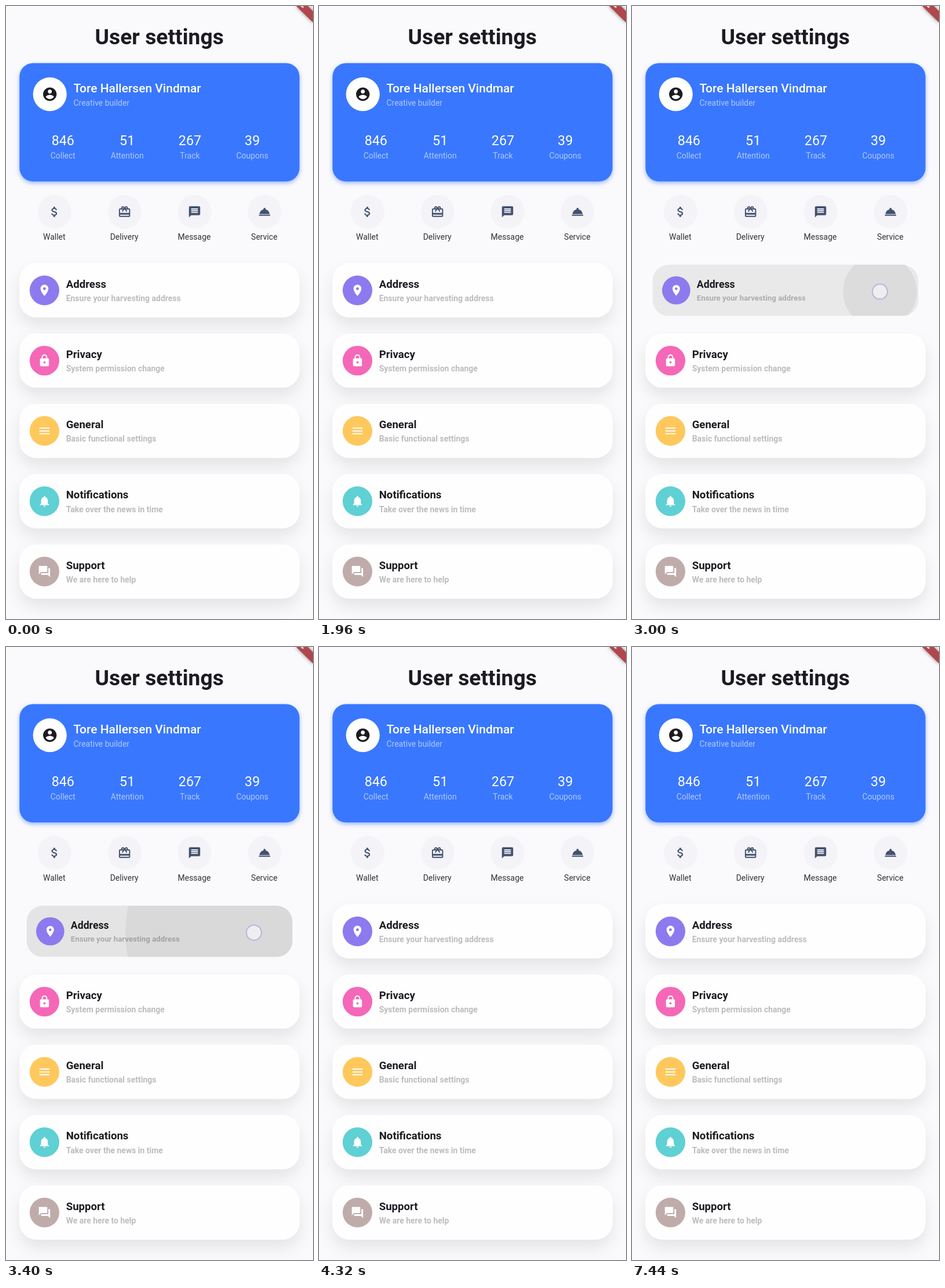
An HTML page that plays this animation: 530x1057 px, repeating every 7.48 s.

```html
<!DOCTYPE html>
<html lang="en">
<head>
<meta charset="utf-8">
<title>User settings</title>
<style>
  html, body { margin: 0; width: 100%; height: 100%; overflow: hidden; background: #faf9fc; }
  svg { display: block; width: 100%; height: 100%; }
  text { font-family: Roboto, sans-serif; }
  .mid { text-anchor: middle; }
  .bold { font-weight: 600; }
  .user { filter: drop-shadow(0 3.5px 3.5px rgba(57, 119, 255, .5)); }
  .shadow { filter: drop-shadow(0 14px 13px rgba(0, 0, 0, .085)); }
  .band { filter: drop-shadow(0 0 3px rgba(0, 0, 0, .5)); }
</style>
</head>
<body>
<svg id="stage" viewBox="0 0 530 1057"></svg>
<script>
const LOOP = 7480, PRESS = 2840, RELEASE = 3600;
const TOUCH = { x: 428, y: 492.5 };
const CENTER = { x: 265, y: 490.3 }, PITCH = 121.2;

const icons = {
  account: 'M12 2C6.48 2 2 6.48 2 12s4.48 10 10 10 10-4.48 10-10S17.52 2 12 2zm0 3c1.66 0 3 1.34 3 3s-1.34 3-3 3-3-1.34-3-3 1.34-3 3-3zm0 14.2c-2.5 0-4.71-1.28-6-3.22.03-1.99 4-3.08 6-3.08 1.99 0 5.97 1.09 6 3.08-1.29 1.94-3.5 3.22-6 3.22z',
  money: 'M11.8 10.9c-2.27-.59-3-1.2-3-2.15 0-1.09 1.01-1.85 2.7-1.85 1.78 0 2.44.85 2.5 2.1h2.21c-.07-1.72-1.12-3.3-3.21-3.81V3h-3v2.16c-1.94.42-3.5 1.68-3.5 3.61 0 2.31 1.91 3.46 4.7 4.13 2.5.6 3 1.48 3 2.41 0 .69-.49 1.79-2.7 1.79-2.06 0-2.87-.92-2.98-2.1h-2.2c.12 2.19 1.76 3.42 3.68 3.83V21h3v-2.15c1.95-.37 3.5-1.5 3.5-3.55 0-2.84-2.43-3.81-4.7-4.4z',
  gift: 'M20 6h-2.18c.11-.31.18-.65.18-1 0-1.66-1.34-3-3-3-1.05 0-1.96.54-2.5 1.35l-.5.67-.5-.68C10.96 2.54 10.05 2 9 2 7.34 2 6 3.34 6 5c0 .35.07.69.18 1H4c-1.11 0-1.99.89-1.99 2L2 19c0 1.11.89 2 2 2h16c1.11 0 2-.89 2-2V8c0-1.11-.89-2-2-2zm-5-2c.55 0 1 .45 1 1s-.45 1-1 1-1-.45-1-1 .45-1 1-1zM9 4c.55 0 1 .45 1 1s-.45 1-1 1-1-.45-1-1 .45-1 1-1zm11 15H4v-2h16v2zm0-5H4V8h5.08L7 10.83 8.62 12 11 8.76l1-1.36 1 1.36L15.38 12 17 10.83 14.92 8H20v6z',
  message: 'M20 2H4c-1.1 0-1.99.9-1.99 2L2 22l4-4h14c1.1 0 2-.9 2-2V4c0-1.1-.9-2-2-2zm-2 12H6v-2h12v2zm0-3H6V9h12v2zm0-3H6V6h12v2z',
  service: 'M2 17h20v2H2zm11.84-9.21c.1-.24.16-.51.16-.79 0-1.1-.9-2-2-2s-2 .9-2 2c0 .28.06.55.16.79C6.25 8.6 3.27 11.93 3 16h18c-.27-4.07-3.25-7.4-7.16-8.21z',
  pin: 'M12 2C8.13 2 5 5.13 5 9c0 5.25 7 13 7 13s7-7.75 7-13c0-3.87-3.13-7-7-7zm0 9.5c-1.38 0-2.5-1.12-2.5-2.5s1.12-2.5 2.5-2.5 2.5 1.12 2.5 2.5-1.12 2.5-2.5 2.5z',
  lock: 'M18 8h-1V6c0-2.76-2.24-5-5-5S7 3.24 7 6v2H6c-1.1 0-2 .9-2 2v10c0 1.1.9 2 2 2h12c1.1 0 2-.9 2-2V10c0-1.1-.9-2-2-2zm-6 9c-1.1 0-2-.9-2-2s.9-2 2-2 2 .9 2 2-.9 2-2 2zm3.1-9H8.9V6c0-1.71 1.39-3.1 3.1-3.1 1.71 0 3.1 1.39 3.1 3.1v2z',
  menu: 'M3 18h18v-2H3v2zm0-5h18v-2H3v2zm0-7v2h18V6H3z',
  bell: 'M12 22c1.1 0 2-.9 2-2h-4c0 1.1.89 2 2 2zm6-6v-5c0-3.07-1.64-5.64-4.5-6.32V4c0-.83-.67-1.5-1.5-1.5s-1.5.67-1.5 1.5v.68C7.63 5.36 6 7.92 6 11v5l-2 2v1h16v-1l-2-2z',
  chat: 'M21 6h-2v9H6v2c0 .55.45 1 1 1h11l4 4V7c0-.55-.45-1-1-1zm-4 6V3c0-.55-.45-1-1-1H3c-.55 0-1 .45-1 1v14l4-4h10c.55 0 1-.45 1-1z'
};

const text = (x, y, size, fill, str, cls = '') =>
  `<text x="${x}" y="${y}" font-size="${size}" fill="${fill}" class="${cls}">${str}</text>`;
const disc = (x, y, r, fill) => `<circle cx="${x}" cy="${y}" r="${r}" fill="${fill}"/>`;
const icon = (name, x, y, size, fill) =>
  `<path d="${icons[name]}" fill="${fill}" fill-rule="evenodd" transform="translate(${x - size / 2} ${y - size / 2}) scale(${size / 24})"/>`;
const panel = (y, extra) => `<rect x="23.3" y="${y}" width="483.4" height="93.2" rx="29" ${extra}/>`;

const stat = ([x, value, label]) =>
  text(x, 240, 23.3, '#fff', value, 'mid') + text(x, 263, 13.98, 'rgba(255,255,255,.6)', label, 'mid');

const action = ([label, name], i) => {
  const x = 83.8 + i * 120.85;
  return disc(x, 354.9, 29.1, '#f4f3f7') + icon(name, x, 354.9, 23.3, '#42526f') +
    text(x - .5, 403, 13.98, 'rgba(0,0,0,.8)', label, 'mid');
};

const setting = ([title, note, name, color], i) => {
  const y = CENTER.y + i * PITCH, top = y - 46.6;
  const ink = i ? '' : `<g clip-path="url(#clip)">${panel(top, 'id="glow" fill="#bcbcbc"')}
    <circle id="splash" fill="#c8c8c8"/></g>`;
  return `<g id="item${i}">${panel(top, `class="shadow" id="shadow${i}" fill="#fff"`)}${panel(top, 'fill="#fffeff"')}${ink}
    ${disc(66.4, y, 25.6, color)}${icon(name, 66.4, y, 23.3, '#fff')}
    ${text(103.7, y - 4.5, 18.64, '#1c1b20', title, 'bold')}
    ${text(103.7, y + 18.7, 13.98, 'rgba(0,0,0,.26)', note, 'bold')}</g>`;
};

const el = id => document.getElementById(id);
el('stage').innerHTML = `<clipPath id="clip">${panel(CENTER.y - 46.6, '')}</clipPath>` +
  text(264.7, 66.3, 37.28, '#1c1b20', 'User settings', 'mid bold') +
  '<rect class="user" x="23.3" y="98.5" width="483.4" height="204" rx="23.3" fill="#3977ff"/>' +
  disc(75.7, 152.1, 29.1, '#fff') + icon('account', 75.7, 152.1, 28, '#1c1b20') +
  `<g font-weight="500">${text(116.5, 148.8, 20.97, '#fff', 'Tore Hallersen Vindmar')}</g>` +
  text(116.5, 172, 13.98, 'rgba(255,255,255,.6)', 'Creative builder') +
  [[98.3, 846, 'Collect'], [209.2, 51, 'Attention'], [317.5, 267, 'Track'], [425.2, 39, 'Coupons']].map(stat).join('') +
  [['Wallet', 'money'], ['Delivery', 'gift'], ['Message', 'message'], ['Service', 'service']].map(action).join('') +
  [
    ['Address', 'Ensure your harvesting address', 'pin', '#8d7aee'],
    ['Privacy', 'System permission change', 'lock', '#f468b7'],
    ['General', 'Basic functional settings', 'menu', '#fec85c'],
    ['Notifications', 'Take over the news in time', 'bell', '#5fd0d3'],
    ['Support', 'We are here to help', 'chat', '#bfacaa']
  ].map(setting).join('') +
  `<circle id="touch" cx="${TOUCH.x}" cy="${TOUCH.y}" r="13" fill="rgba(242,242,245,.8)" stroke="#b7b7dc" stroke-width="2"/>
  <path class="band" d="M500 -1L520 -1 531 10V29.5z" fill="#b0474c"/>
  <path d="M509.5 0l4 2.5" stroke="#f3dfe1" stroke-width="2.5"/>`;

const ramp = (t, from, duration) => Math.min(1, Math.max(0, (t - from) / duration));

// cubic-bezier(0, 0, .58, 1)
function easeOut(x) {
  let lo = 0, hi = 1;
  for (let i = 0; i < 20; i++) {
    const u = (lo + hi) / 2;
    if (1.74 * u * u * (1 - u) + u ** 3 < x) lo = u; else hi = u;
  }
  return lo * lo * (3 - 2 * lo);
}

function draw(t) {
  const pressed = easeOut(ramp(t, PRESS, 150)) - easeOut(ramp(t, RELEASE, 150));
  const scale = 1 - .05 * pressed;
  const fade = 1 - ramp(t, RELEASE, 200);
  const held = ramp(Math.min(t, RELEASE), PRESS, 1000);
  const spread = held + (1 - held) * ramp(t, RELEASE, 400);

  el('item0').setAttribute('transform',
    `translate(${CENTER.x} ${CENTER.y}) scale(${scale}) translate(${-CENTER.x} ${-CENTER.y})`);
  el('shadow0').style.filter =
    `drop-shadow(0 ${14 * (1 - pressed)}px ${13 * (1 - pressed)}px rgba(0,0,0,${.085 * (1 - pressed)}))`;
  el('glow').setAttribute('opacity', .4 * ramp(t, PRESS, 200) * fade);

  const splash = el('splash');
  splash.setAttribute('cx', CENTER.x + (TOUCH.x - CENTER.x) / scale);
  splash.setAttribute('cy', TOUCH.y);
  splash.setAttribute('r', 416 * spread);
  splash.setAttribute('opacity', .4 * fade);
  el('touch').setAttribute('opacity', ramp(t, 2720, 220) * (1 - ramp(t, RELEASE, 320)));
}

function tick() {
  draw(performance.now() % LOOP);
  requestAnimationFrame(tick);
}
tick();
</script>
</body>
</html>
```
